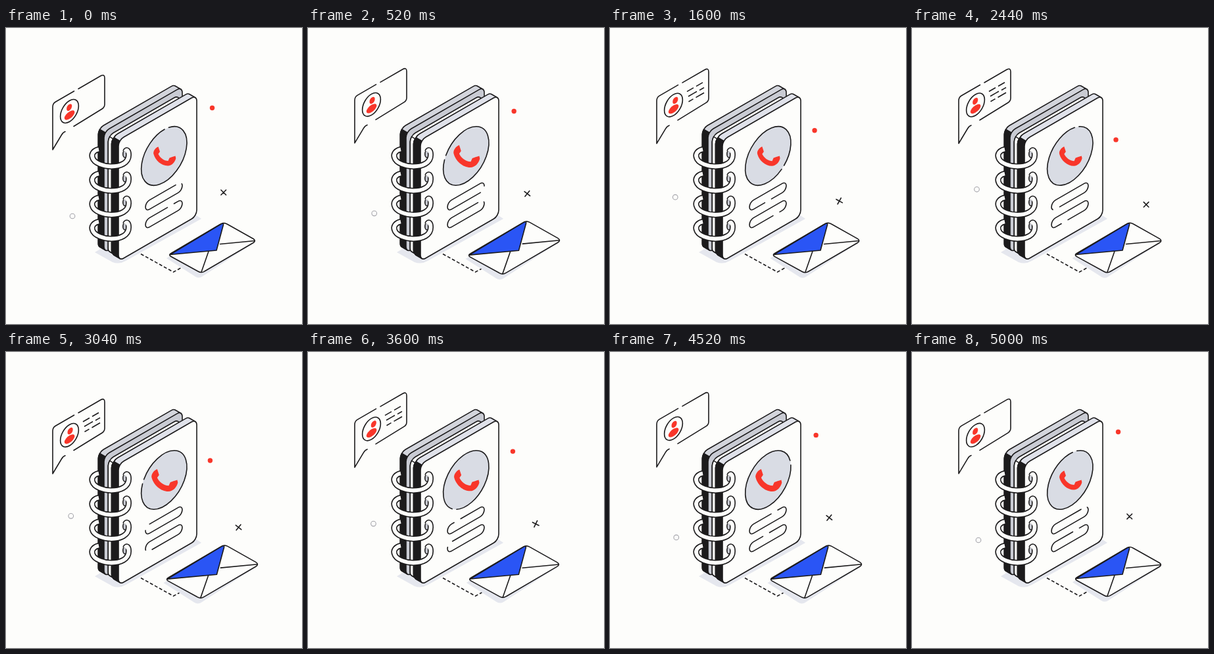
An HTML page for the animation above (5040 ms loop, 450x450 px).

```html
<!DOCTYPE html>
<html lang="en">
<head>
<meta charset="utf-8">
<title>Contact book</title>
<style>
  html, body { margin: 0; width: 100%; height: 100%; overflow: hidden; background: #fdfdfb; }
  svg { display: block; width: 100vw; height: 100vh; }
  .line { fill: none; stroke: #1c1b1c; stroke-width: 1.6; stroke-linecap: round; stroke-linejoin: round; }
  .line, .line * { vector-effect: non-scaling-stroke; }
  .red { fill: #f8362a; }
  .shade { fill: #e5e7ee; }
</style>
</head>
<body>
<svg viewBox="0 0 450 450">
  <path class="shade" d="M135 341L150 332L285 282L297 290L182 354Q172 360 162 356Z"/>
  <path class="line" stroke-dasharray="5 3" style="stroke-linecap:butt" d="M205 343.5L254.5 371L270 362.5"/>

  <g id="book"></g>
  <g id="rings"></g>

  <g class="line" transform="matrix(.866 -.5 0 1 240.3 194.5)">
    <circle r="40" fill="#d9dce4" stroke="none"/>
    <circle id="disc" r="40" pathLength="360" stroke-dasharray="344 16"/>
  </g>
  <path id="phone" class="red" d="M231.5 180.5C227 182 223 188 224.5 192C227 201 236 209.5 246 209.5C252 209.5 257 204 258.3 198L257.5 194.5C254 195.5 251 196.5 248.5 197.5L246.5 202C240 202 234 197 231.5 191.5L234 188Z"/>
  <g id="pills" class="line"></g>

  <g id="mail">
    <path class="shade" d="M244 350L326 302L375 328L298 378Q293 381 288 378Z"/>
    <g class="line">
      <path fill="#fdfdfb" d="M251 342.5L326 298.3Q331 295 336 298L376 320.5Q380.5 323.5 376 326.5L302 369.8Q297 373 292 370L251 347.5Q246.5 345 251 342.5Z"/>
      <path d="M297 371L308 339.5M325.500 328.5L378 323.5"/>
      <path fill="#2a55f5" d="M249.5 344.5L327 298Q331 296 330.500 299L320 338Z"/>
    </g>
  </g>

  <g id="bubble" class="line">
    <path d="M110 92.5L144 72.8Q150 69.5 150 76V116Q150 120.5 146 123L103 149.5M90 157.5Q87 158.3 84.5 162.5L71 185V120Q71 115 75 112.5L103.5 96"/>
    <circle r="16" transform="matrix(.866 -.5 0 1 96.5 126.5)"/>
    <g stroke="none">
      <ellipse class="red" rx="9" ry="5.6" transform="matrix(.866 -.5 0 1 96.6 132.5)"/>
      <circle id="head" class="red" r="4.7"/>
    </g>
    <g id="text"></g>
  </g>

  <circle id="dot" class="red" r="3.7"/>
  <circle id="ring" r="3.8" fill="none" stroke="#a5a5ab" stroke-width="1.1"/>
  <path id="cross" class="line" d="M-3.8 -3.8L3.8 3.8M3.8 -3.8L-3.8 3.8"/>
</svg>
<script>
const LOOP = 5040, INK = '#1c1b1c', PAPER = '#fdfdfb';
const $ = id => document.getElementById(id);
const set = (id, name, value) => $(id).setAttribute(name, value);
const move = (id, x, y, rest = '') => set(id, 'transform', `translate(${x} ${y})${rest}`);
const zoom = (id, x, y, s) => move(id, x, y, ` scale(${s}) translate(${-x} ${-y})`);
// Smooth swing 0 -> 1 -> 0, repeated n times per loop
const swing = (t, n) => (1 - Math.cos(2 * Math.PI * n * t / LOOP)) / 2;
const ease = p => (1 - Math.cos(Math.PI * Math.max(0, Math.min(1, p)))) / 2;

// Rounded slab on the isometric face plane, extruded back by d
function slab(x, y, w, h, d, face, edge, side) {
  const r = 9, k = r * (1 - Math.SQRT1_2), arc = `A${r} ${r} 0 0 `;
  const start = `${k - d} ${h - k - d}`;
  const left = `${arc}1 ${-d} ${h - r - d}V${r - d}${arc}1 ${k - d} ${k - d}`;
  const top = `${arc}1 ${r - d} ${-d}H${w - r - d}${arc}1 ${w - k - d} ${k - d}`;
  return `<g class="line" transform="matrix(.866 -.5 0 1 ${x} ${y})">
    <path fill="${edge}" d="M${k} ${h - k}L${start}${left}${top}L${w - k} ${k}Z"/>
    <path fill="${side}" d="M${start}${left}L${k} ${k}${arc}0 0 ${r}V${h - r}${arc}0 ${k} ${h - k}Z"/>
    <rect width="${w}" height="${h}" rx="${r}" fill="${face}"/></g>`;
}

$('book').innerHTML =
  slab(149, 157.8, 137.4, 184, 10, '#c9cbd3', '#d3d5dc', INK) +
  slab(160.5, 167, 125, 180, 6, PAPER, PAPER, PAPER) +
  slab(171, 170.5, 137.4, 184, 10.4, PAPER, '#e0e2ea', INK);

const coil = 'M141 184.5C133 186 129.5 192 131.5 197C134 206 150 210.5 160 210.5C174 210.5 186.5 205 186.5 193C186.5 186 183 183.5 181.5 188';
$('rings').innerHTML = [0, 37, 73.5, 110].map(y => `<g fill="none" stroke="${INK}" transform="translate(0 ${y})">
  <ellipse cx="181" cy="191.5" rx="3.2" ry="5.5" fill="#c9cbd3" stroke-width="1.6"/>
  <path d="${coil}" stroke-width="9"/>
  <path d="${coil}" stroke="${PAPER}" stroke-width="5.8"/></g>`).join('');

// Pill outline runs clockwise from the right end of its top edge
$('pills').innerHTML = [256, 283].map(y => `<path pathLength="100" stroke-dasharray="92 8"
  transform="matrix(.866 -.5 0 1 240 ${y})" d="M25.3 -7A7 7 0 0 1 25.3 7H-25.3A7 7 0 0 1 -25.3 -7Z"/>`).join('');
const pills = [...$('pills').children];

// Note lines: x, y, length along x
$('text').innerHTML = [[117, 106, 10], [131, 98, 10], [119, 113.3, 13], [136, 104, 7], [119.5, 121.3, 7], [130.5, 115, 12.5]]
  .map(([x, y, w]) => `<path pathLength="1" style="stroke-linecap:butt" d="M${x} ${y}l${w} ${-w * .577}"/>`).join('');
const notes = [...$('text').children];

function draw(t) {
  const s = swing(t, 1), turn = t / LOOP;

  move('dot', 313.5 - 3.5 * s, 121.5 + 48.5 * s);
  move('ring', 101 - 2.5 * s, 286 - 40.8 * s);
  move('cross', 330.7 + 25.4 * s, 250 + 18.5 * s, ` rotate(${-20 * Math.sin(Math.PI * s)})`);

  const pulse = swing(t, 6);
  zoom('mail', 313.8, 334.2, 1 + .075 * pulse);
  zoom('phone', 241, 194.5, 1 + .2 * pulse);

  set('disc', 'transform', `rotate(${-78 - 720 * turn})`);
  pills.forEach((p, i) => p.setAttribute('stroke-dashoffset', 96 - 100 * (turn - .1 * i)));

  move('bubble', 0, -10.1 * swing(t, 5));
  const h = swing(t, 2);
  set('head', 'transform', `matrix(.866 -.5 0 1 ${96.2 + 3.8 * h} ${120.7 - 1.6 * h})`);

  const shown = ease((t - 1080) / 480) * (1 - ease((t - 3700) / 660));
  notes.forEach(n => {
    n.setAttribute('stroke-dasharray', `${.65 * shown} ${1 - shown} ${.35 * shown} 1`);
    n.style.display = shown > .01 ? '' : 'none';
  });
}

function tick(now) {
  draw(now % LOOP);
  requestAnimationFrame(tick);
}
draw(0);
requestAnimationFrame(tick);
</script>
</body>
</html>
```
